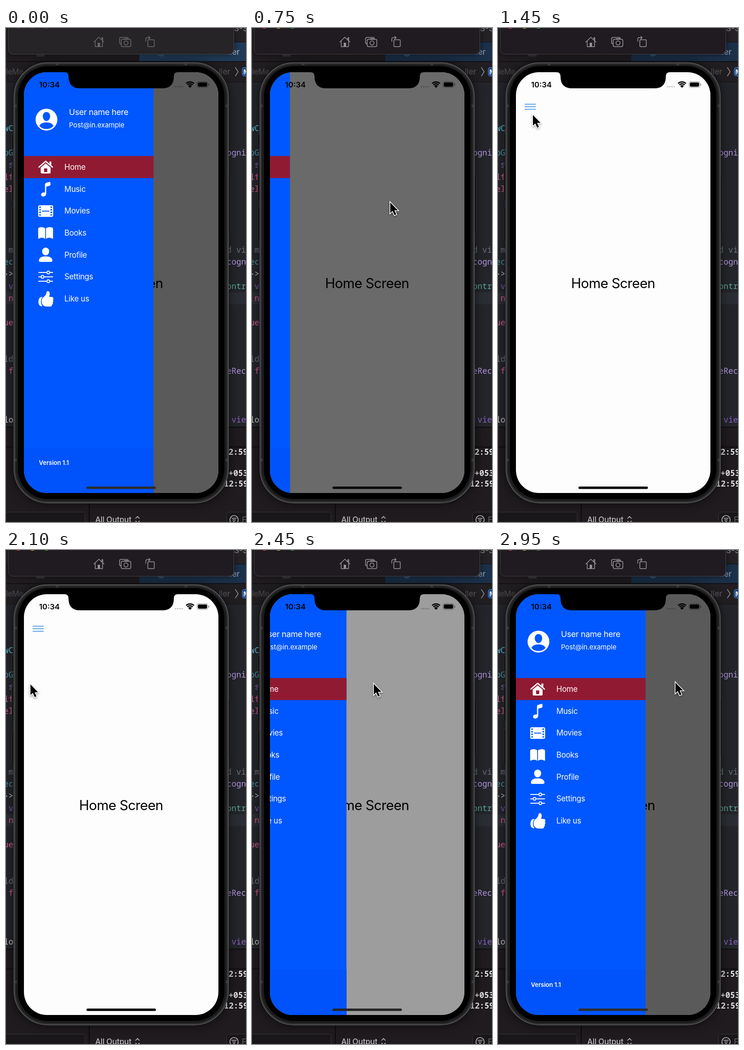
These frames come from a looping animation (522 px wide and 1073 px high, 3 s). An HTML page with a canvas:

```html
<!DOCTYPE html>
<html lang="en">
<head>
<meta charset="utf-8">
<title>Side menu demo</title>
<style>
html, body { margin: 0; width: 100%; height: 100%; overflow: hidden; background: #1e1b1f; }
canvas { display: block; width: 522px; height: 1073px; }
</style>
</head>
<body>
<canvas id="stage"></canvas>
<script>
const W = 522, H = 1073, LOOP = 3000, STEP = 50;
const SANS = 'Inter, "Noto Sans", sans-serif';
const MONO = '"Noto Sans Mono", "DejaVu Sans Mono", monospace';
const BLUE = '#0057ff', RED = '#911a33';
const SCREEN = { x: 39, y: 96, w: 423, h: 914, r: 50 };
const MENU_W = 282, FULL_DIM = 0.642, CLOSE_AT = 653, DRAG_AT = 2200;

const canvas = document.getElementById('stage');
const ratio = window.devicePixelRatio || 1;
canvas.width = W * ratio;
canvas.height = H * ratio;
const ctx = canvas.getContext('2d');

// --- helpers ---
function box(x, y, w, h, fill, r = 0) {
  ctx.beginPath();
  ctx.roundRect(x, y, w, h, r);
  if (fill) { ctx.fillStyle = fill; ctx.fill(); }
}

function outline(color, width = 1) {
  ctx.strokeStyle = color;
  ctx.lineWidth = width;
  ctx.stroke();
}

function disc(x, y, r, fill) {
  ctx.beginPath();
  ctx.arc(x, y, r, 0, Math.PI * 2);
  if (fill) { ctx.fillStyle = fill; ctx.fill(); }
}

function shape(d, fill, rule = 'nonzero') {
  ctx.fillStyle = fill;
  ctx.fill(new Path2D(d), rule);
}

function line(d, color, width) {
  ctx.strokeStyle = color;
  ctx.lineWidth = width;
  ctx.stroke(new Path2D(d));
}

function text(str, x, y, font, fill, spacing = 0, align = 'left') {
  ctx.font = font;
  ctx.letterSpacing = spacing + 'px';
  ctx.textAlign = align;
  ctx.textBaseline = 'alphabetic';
  ctx.fillStyle = fill;
  ctx.fillText(str, x, y);
}

const clamp = v => Math.min(1, Math.max(0, v));
const smooth = v => { v = clamp(v); return v * v * (3 - 2 * v); };

// --- motion ---
// Pointer stops: time, x, y
const POINTER = [
  [150, 424, 1075], [350, 392, 640], [550, 362, 378], [600, 362, 378],
  [770, 290, 379], [950, 175, 379], [1050, 158, 377], [1150, 150, 360],
  [1350, 82, 203], [1450, 76, 189], [1650, 72, 182], [1800, 67, 204],
  [2050, 53, 292], [2150, 54, 292], [2200, 68, 291], [2450, 265, 291],
  [2700, 384, 289], [2800, 386, 288], [3000, 386, 288]
];

function pointerAt(t) {
  if (t < POINTER[0][0]) return null;
  let i = 0;
  while (i < POINTER.length - 2 && t >= POINTER[i + 1][0]) i++;
  const a = POINTER[i], b = POINTER[i + 1];
  const before = POINTER[i - 1] || a, after = POINTER[i + 2] || b;
  const span = b[0] - a[0], u = (t - a[0]) / span;
  const tangent = (p, q, r, k) => {
    const s1 = (q[k] - p[k]) / (q[0] - p[0] || 1);
    const s2 = (r[k] - q[k]) / (r[0] - q[0] || 1);
    return s1 * s2 <= 0 ? 0 : 2 * s1 * s2 / (s1 + s2);
  };
  const at = k => {
    const m0 = tangent(before, a, b, k) * span, m1 = tangent(a, b, after, k) * span;
    const u2 = u * u, u3 = u2 * u;
    return (2 * u3 - 3 * u2 + 1) * a[k] + (u3 - 2 * u2 + u) * m0 +
           (3 * u2 - 2 * u3) * b[k] + (u3 - u2) * m1;
  };
  return { x: at(1), y: at(2) };
}

function menuAt(t, pointer) {
  if (t < CLOSE_AT) return { offset: 0, dim: FULL_DIM };
  if (t < DRAG_AT) {
    const k = (t - CLOSE_AT) / 54;
    return {
      offset: -445 * (1 - (1 + k) * Math.exp(-k)),
      dim: FULL_DIM * (1 - smooth((t - CLOSE_AT) / 500))
    };
  }
  const open = clamp((pointer.x - 98.5) / MENU_W);
  return { offset: (open - 1) * MENU_W, dim: FULL_DIM * open };
}

// --- editor behind the phone ---
const CODE_LEFT = [
  [218, 'wC', '#5cc3dc'], [271, 'pG', '#4a91a3'], [297, 's', '#9466c4'],
  [324, 'lf', '#d95a8c'], [350, 'el', '#d95a8c'], [482, 'm', '#6b717a'],
  [508, 'ec', '#4a91a3'], [534, '->', '#c9c9cc'], [561, 'v', '#8459b8'],
  [587, 'n', '#d95a8c'], [640, 'ue', '#d95a8c'], [719, 'ld', '#6b717a'],
  [745, 'f', '#d95a8c'], [851, 'lo', '#c9c9cc']
];
const CODE_RIGHT = [
  [271, 'ogni', '#b595dd'], [482, 'd vi', '#6b717a'], [508, 'cogn', '#b595dd'],
  [561, 'ontr', '#5fa596'], [745, 'eRec', '#b595dd'], [851, ' vie', '#8c62c4']
];

function editor(active) {
  const mono = '500 17.5px ' + MONO;
  box(0, 0, W, H, '#23252a');
  box(0, 574, W, 26, '#2a2d33');
  box(0, 0, W, 31, '#252226');
  box(0, 31, W, 42, '#211d20');
  box(290, 31, 232, 42, active ? '#203b58' : '#1b3049');
  box(0, 30, W, 1, '#111012');
  box(0, 72, W, 2, '#121113');
  box(0, 74, W, 43, '#211e22');
  box(0, 117, W, 1, '#151417');
  text('S-S', 496, 7, '600 17px ' + SANS, '#77757a');
  text('ller', 483, 58, '500 17px ' + SANS, active ? '#a6b1be' : '#8896a6');
  text('leMe', 0, 101, '17px ' + SANS, '#4b494d', -0.4);
  text('ller', 463, 101, '17px ' + SANS, '#5c5a5f');
  line('M499 86 L505 95 L499 104', '#8d8b90', 1.6);
  box(514, 86, 18, 18, '#173d77', 4);
  outline('#3c7bd0', 1.5);
  text('M', 516, 101, '700 15px ' + SANS, '#dbe6f5');
  box(66, 54, 18, 8, '#3a373b', 2);
  disc(337, 54, 8, '#315372');

  for (const [y, s, c] of CODE_LEFT) text(s, 16, y + 6, mono, c, 0, 'right');
  for (const [y, s, c] of CODE_RIGHT) text(s, 480, y + 6, mono, c);

  box(0, 866, W, 207, '#1f1b1f');
  box(0, 866, W, 2, '#0e0d0f');
  box(0, 909, W, 2, '#0e0d0f');
  box(180, 911, 2, 162, '#0c0b0c');
  const log = '700 17.5px ' + MONO;
  text('2:59', 484, 927, log, '#e0dfe1');
  text('+053', 484, 973, log, '#e0dfe1');
  text('12:59', 474, 996, log, '#e0dfe1');
  box(-10, 1051.5, 182, 30, '#1a171a', 5);
  outline('#38353a');
  text('All Output', 194, 1074, '500 17px ' + SANS, '#bdbbbf', -0.2);
  line('M282 1065 L286 1061 L290 1065 M282 1071 L286 1075 L290 1071', '#bdbbbf', 1.6);
  box(479.5, 1051.5, 60, 34, '#1a171a', 6);
  outline('#38353a');
  disc(496, 1068, 9);
  outline('#bdbbbf', 1.6);
  line('M491 1065 H501 M493 1068.5 H499 M494.5 1072 H497.5', '#bdbbbf', 1.5);
  text('F', 513, 1074, '17px ' + SANS, '#66646a');
}

function toolbar(active) {
  ctx.save();
  ctx.shadowColor = 'rgba(0,0,0,.6)';
  ctx.shadowBlur = 14 * ratio;
  box(5, -20, 490.5, 77, active ? '#1f1b20' : '#262427', 10);
  ctx.restore();
  outline('#47444a', 1);
  const lights = active ? ['#f2483f', '#f2b52e', '#2fbd3d'] : ['#48464a', '#48464a', '#48464a'];
  lights.forEach((c, i) => disc(27 + 30.5 * i, -7, 8.3, c));

  const ink = active ? '#9a979c' : '#6d6a6f';
  line('M191 30.5 L202 20 L213 30.5 M194 29 V40.5 H210 V29 M208.5 25 V21 H210.5 V28', ink, 1.5);
  box(199.5, 32, 5, 8.5, ink);
  box(247, 20.5, 19, 14, null, 3);
  outline(ink, 1.5);
  box(250.5, 24.5, 21, 16, active ? '#1f1b20' : '#262427', 3);
  outline(ink, 1.5);
  disc(261, 32.5, 4.4);
  outline(ink, 1.5);
  box(257, 22.5, 8, 2.5, ink, 1);
  box(308.5, 25.5, 14, 15, null, 1.5);
  outline(ink, 1.5);
  line('M304 29 V24 Q304 21 307 21 H313 M310.5 18 L313.5 21 L310.5 24', ink, 1.4);
}

// --- phone ---
function sideButton(x, y, w, h) {
  box(x, y, w, h, '#1d1c1e', 2);
  outline('#3a393c', 1);
}

function frame() {
  sideButton(12.5, 229, 8, 34);
  sideButton(12.5, 297, 8, 77);
  sideButton(12.5, 389, 8, 76);
  sideButton(481, 322, 7, 126);
  ctx.save();
  ctx.shadowColor = 'rgba(0,0,0,.65)';
  ctx.shadowBlur = 22 * ratio;
  box(17.5, 75.5, 466, 956, '#2b2b2c', 74);
  ctx.restore();
  outline('#606062', 1.4);
  box(20.5, 78.5, 460, 950, '#1b1b1c', 71);
  outline('#39393b', 1);
  for (const [x, y, w, h] of [[108, 76, 6, 5], [388, 76, 6, 5], [18, 166, 5, 6], [478, 166, 5, 6],
                             [18, 935, 5, 6], [478, 935, 5, 6]]) box(x, y, w, h, '#3b3b3d');
  box(26, 83, 449, 940, '#000', 65);
}

function statusBar() {
  shape('M127 95 H374 V96 Q365 96 365 105 V107 Q364 131 340 131 H161 Q137 131 136 107 V105 Q136 96 127 96 Z', '#000');
  text('10:34', 72, 129, '600 16.6px ' + SANS, '#000');
  for (let i = 0; i < 4; i++) disc(369 + i * 4.8, 127.5, 1.6, 'rgba(0,0,0,.25)');
  ctx.lineCap = 'butt';
  for (const r of [4.2, 8.2, 12.2]) {
    ctx.beginPath();
    ctx.arc(400.3, 129.3, r, -Math.PI * 0.75, -Math.PI * 0.25);
    outline('#000', 2.6);
  }
  shape('M400.3 130 L396.6 126.3 Q400.3 123.6 404 126.3 Z', '#000');
  box(415.5, 116.5, 23.5, 12.8, null, 4);
  outline('rgba(0,0,0,.42)', 1.1);
  box(417.3, 118.3, 20, 9.2, '#000', 2.4);
  box(440.3, 120.8, 1.6, 4.4, 'rgba(0,0,0,.45)', 1);
}

const ITEMS = ['Home', 'Music', 'Movies', 'Books', 'Profile', 'Settings', 'Like us'];

function menuIcons() {
  const white = '#fff';
  ctx.lineCap = ctx.lineJoin = 'round';

  disc(88, 199, 23.7, white);
  shape('M88 182.5 C93 182.5 96 186.5 96 191.5 C96 197 92.5 202 88 202 C83.5 202 80 197 80 191.5 C80 186.5 83 182.5 88 182.5 Z', BLUE);
  shape('M72.5 212.5 Q76 205 88 205 Q100 205 103.5 212.5 Q97.500 219.500 88 219.500 Q78.500 219.500 72.500 212.500 Z', BLUE);

  line('M71.8 302 L86.300 289.500 L100.800 302', white, 2.8);
  shape('M94.500 290 H98.500 V299 L94.500 295.500 Z', white);
  shape('M75.500 303.300 L86.300 294 L97 303.300 V313.500 Q97 316 94.500 316 H78 Q75.500 316 75.500 313.500 Z M82.800 305 V313 H89.700 V305 Z', white, 'evenodd');

  shape('M84.800 357 V339.500 Q84.800 337 87.200 336.300 L94.700 334.200 Q96.700 333.800 96.700 335.700 V340.500 Q96.700 342 95.200 342.500 L87.500 344.700 V359.500 C87.500 363.500 84.500 366 81 366 C78 366 76.300 364.300 76.300 361.900 C76.300 357 82 357.600 84.800 357 Z', white);

  box(70, 385, 32.5, 25.3, white, 3.5);
  for (const x of [72.3, 96.7]) for (let i = 0; i < 4; i++) box(x, 387.6 + i * 5.6, 3.5, 3.2, BLUE, 0.8);
  box(78.5, 396.7, 15.5, 2, BLUE);

  shape('M70 436 Q70 434.500 71.500 433.800 Q79 430.500 85.300 435 V458 Q79 453.500 71.500 457.500 Q70 458 70 456.500 Z', white);
  shape('M102.300 436 Q102.300 434.500 100.800 433.800 Q93.300 430.500 87 435 V458 Q93.300 453.500 100.800 457.500 Q102.300 458 102.300 456.500 Z', white);

  shape('M86.200 477 C91 477 93.800 480.700 93.800 485 C93.800 490 90.500 493.800 86.200 493.800 C82 493.800 78.600 490 78.600 485 C78.600 480.700 81.500 477 86.200 477 Z', white);
  shape('M71.500 505 Q72.500 496 86.200 496 Q100 496 101 505 Q101 508 98 508 H74.500 Q71.500 508 71.500 505 Z', white);

  for (const [y, x] of [[531, 92], [540.5, 79.5], [550, 92]]) {
    line(`M71 ${y} H101.500`, white, 1.9);
    disc(x, y, 3, BLUE);
    outline(white, 1.8);
  }

  shape('M75.500 584.500 Q70.500 587 70.500 595 Q70.500 602.500 76 604.300 H79.500 Q76 600 76 594.500 Q76 588 79.500 584.500 Z', white);
  shape('M81 585 C84 582.500 87.500 579.500 88 575 Q88.300 571.500 91 571.500 C94.500 571.500 95.500 575.500 95 579 L93.800 584 H99 C103.500 584 104 589 101.800 590.500 C103.500 592.500 103.300 595 101.500 596 C102.700 598.500 101.800 600.500 100 601 C100.300 604 98.500 605 95.500 605 H89 C81.500 605 77.500 600 77.500 594.500 Q77.500 588 81 585 Z', white);
}

function menu(offset) {
  if (offset <= -MENU_W) return;
  ctx.save();
  ctx.translate(offset, 0);
  box(39, 96, MENU_W, 914, BLUE);
  box(39, 912, MENU_W, 98, '#0053fb');
  box(39, 278, MENU_W, 48, RED);
  menuIcons();
  text('User name here', 137, 188.5, '17.8px ' + SANS, '#fff', -0.33);
  text('Post@in.example', 137, 215.5, '14.8px ' + SANS, '#fff');
  ITEMS.forEach((name, i) => text(name, 127, 308 + i * 47.65, '16.8px ' + SANS, '#fff', -0.28));
  text('Version 1.1', 71.5, 948.5, '600 13px ' + SANS, '#fff');
  ctx.restore();
}

function phone(state) {
  const { x, y, w, h, r } = SCREEN;
  frame();
  ctx.save();
  box(x, y, w, h, '#fdfdfd', r);
  ctx.clip();
  ctx.lineCap = 'butt';
  line('M58 165.500 H82 M58 171 H82 M58 176.500 H82', '#2f87e0', 1.7);
  text('Home Screen', 159, 564.5, '29.5px ' + SANS, '#000', -0.6);
  box(x, y, w, h, `rgba(0,0,0,${state.dim})`);
  menu(state.offset);
  const open = clamp(1 + state.offset / MENU_W);
  const tone = Math.round(44 * Math.min(1, open * 1.4));
  box(175, 996, 151, 5.2, `rgb(${tone},${tone},${tone + 3})`, 2.6);
  ctx.restore();
  statusBar();
}

function pointerArrow({ x, y }) {
  const arrow = new Path2D('M0 0 V23 L5 18.300 L9.300 27.500 L13 25.800 L9 17 H16.500 Z');
  ctx.save();
  ctx.translate(x, y);
  ctx.lineJoin = 'miter';
  ctx.shadowColor = 'rgba(0,0,0,.4)';
  ctx.shadowBlur = 4 * ratio;
  ctx.shadowOffsetY = 2 * ratio;
  ctx.strokeStyle = '#fff';
  ctx.lineWidth = 3;
  ctx.stroke(arrow);
  ctx.shadowColor = 'transparent';
  ctx.fillStyle = '#000';
  ctx.fill(arrow);
  ctx.restore();
}

function draw() {
  const t = Math.floor((performance.now() % LOOP) / STEP) * STEP;
  const simulatorActive = t >= 650;
  const pointer = pointerAt(t);
  ctx.setTransform(ratio, 0, 0, ratio, 0, 0);
  ctx.lineCap = ctx.lineJoin = 'round';
  editor(!simulatorActive);
  toolbar(simulatorActive);
  phone(menuAt(t, pointer));
  if (pointer) pointerArrow(pointer);
  requestAnimationFrame(draw);
}

draw();
</script>
</body>
</html>
```
